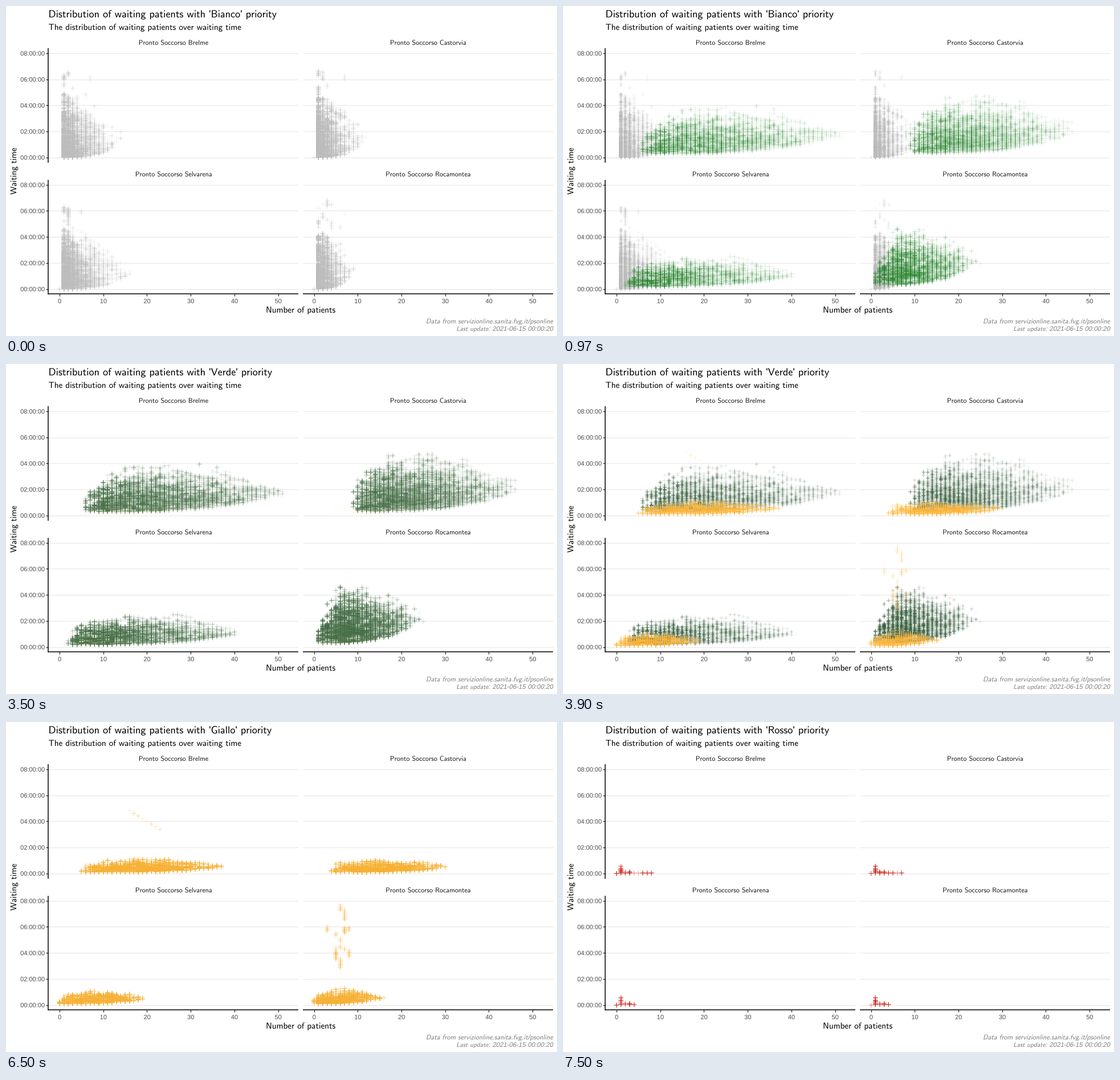
Animation of 967 by 579 pixels, one loop 8 s. Source, as a matplotlib script:

```python
from itertools import groupby

import matplotlib.pyplot as plt
import numpy as np
from matplotlib.animation import FuncAnimation
from matplotlib.patches import PathPatch
from matplotlib.textpath import TextPath
from matplotlib.transforms import Affine2D

plt.rcParams["mathtext.fontset"] = "cm"

W, H, DPI = 967, 579, 64
PX = 72 / DPI
STEP_MS, LOOP_MS = 50, 8000

# panel geometry: pixel of the zero point, pixels per patient and per hour
X0, Y0 = (94.0, 540.6), (265.7, 496.5)
PER_X, PER_H = 7.67, 22.84
EDGES = ((74.3, 513.2), (520.8, 960))
COLS, SUB, WALK = 60, 4, 6
ARM, HALF_STROKE = 4.2, 0.62

PLACES = ["Brelme", "Castorvia", "Selvarena", "Rocamontea"]
NAMES = ["Bianco", "Verde", "Giallo", "Rosso"]

# per panel: fewest patients, most patients, longest wait in hours
WHITE = [(1, 16, 5.2), (1, 13, 5.3), (1, 18, 5.0), (1, 10, 5.4)]
GREEN = [(6, 52, 4.3), (9, 48, 5.2), (2, 43, 2.8), (1, 25, 5.0)]
AMBER = [(5, 38, 1.25), (4, 31, 1.2), (0, 20, 1.25), (0, 16, 1.4)]
RED_LAST = (8, 7, 4, 4)


def falling(s):
    return 1 - .65 * s ** 1.3


def dome(s):
    return .4 + .6 * np.sin(np.pi * s ** .8) ** .6


def cloud(rng, panel, limits, rate, shape, low, x_beta, y_beta):
    """Short random walks of marks between a floor and a shaped top."""
    first, last, peak = limits
    span = last - first
    n = int(rate * span * peak / WALK)
    drift = rng.normal(size=(2, n, WALK)).cumsum(2)
    s = rng.beta(*x_beta, n)[:, None] + .4 * drift[0] / span
    x = np.rint(first + span * s).clip(first, last).astype(int)
    s = (x - first) / span
    floor = peak * (low + .33 * s ** 3)
    room = np.maximum(peak * shape(s) - floor, 0)
    y = floor + room * abs(rng.beta(*y_beta, n)[:, None] + .015 * drift[1])
    return panel, x.ravel(), y.ravel()


def streak(panel, x, start, length):
    """Marks every few minutes while the number of patients stays the same."""
    y = start + np.arange(0, length + .01, .08)
    return panel, np.full(len(y), x), y


def white(rng):
    for k, limits in enumerate(WHITE):
        yield cloud(rng, k, limits, 60, falling, 0, (.9, 3.3), (1, 2.5))
        yield streak(k, 0, 0, 0)
        for x in rng.geometric(.4, 12).clip(1, 7):
            yield streak(k, x, limits[2] * rng.uniform(.8, 1.25), rng.exponential(.2))


def green(rng):
    for k, limits in enumerate(GREEN):
        yield cloud(rng, k, limits, 46, dome, .06, (1.9, 2.7), (1.4, 3.4))


def amber(rng):
    for k, limits in enumerate(AMBER):
        yield cloud(rng, k, limits, 85, dome, .06, (1.9, 2.7), (1.5, 3.3))
    for x in range(16, 24):
        yield streak(0, x, 8.1 - .205 * x, 0)
    for x in rng.integers(3, 10, 16):
        yield streak(3, x, rng.uniform(2.4, 7.4), rng.uniform(.1, .6))


def red(rng):
    for k, last in enumerate(RED_LAST):
        yield streak(k, 0, 0, 0)
        yield streak(k, 1, .55, 0)
        for x in range(1, last + 1):
            yield streak(k, x, .04, .38 / x - .04)


def marks(seed, rule, gain, power, cap):
    """Histogram cell and opacity of every mark of one priority."""
    rng = np.random.default_rng(seed)
    cells, alphas = [], []
    for panel, x, y in rule(rng):
        row = ((Y0[panel // 2] - y * PER_H) * SUB).astype(int)
        cells.append(row * 2 * COLS + panel % 2 * COLS + x)
        alpha = gain / np.maximum(x, 1) ** power * rng.uniform(.3, 1.4, len(x))
        alphas.append(alpha.clip(.02, cap))
    return np.concatenate(cells), np.concatenate(alphas)


MARKS = [marks(3, white, .5, .8, .6), marks(5, green, 2.6, 1, .33),
         marks(7, amber, .3, 0, .5), marks(9, red, 1, 0, .75)]
COLORS = np.array([(188, 188, 188), (70, 112, 70), (255, 180, 50), (200, 28, 18)], float)
ENTER = np.array([(188, 188, 188), (10, 140, 20), (255, 178, 45), (200, 28, 18)], float)
EXIT = np.array([(184, 184, 184), (35, 70, 50), (120, 120, 60), (200, 28, 18)], float)

CENTERS = np.concatenate([x0 + PER_X * np.arange(COLS) for x0 in X0])[:, None]


def cover(half):
    """Share of each pixel column covered by a bar around each x position."""
    px = np.arange(W)
    return np.clip(np.minimum(CENTERS + half, px + 1)
                   - np.maximum(CENTERS - half, px), 0, 1)


def spread(hist, half):
    """Sum of the marks within half a length of each pixel row."""
    w = max(1, round(2 * half * SUB))
    total = np.pad(hist, ((w, w), (0, 0))).cumsum(0)
    window = (total[w:] - total[:-w])[w - w // 2 - 1:][:len(hist)]
    return window.reshape(H, SUB, -1).mean(1)


def layer(k, fade, arm):
    cell, alpha = MARKS[k]
    hist = np.bincount(cell, -np.log(1 - alpha * fade), minlength=H * SUB * 2 * COLS)
    hist = hist.reshape(H * SUB, 2 * COLS)
    depth = (spread(hist, HALF_STROKE) @ cover(arm)
             + spread(hist, arm) @ cover(HALF_STROKE))
    return (1 - np.exp(-depth))[..., None]


def picture(k, p):
    """RGBA image of priority k on its way (p) to the next one."""
    alpha = under = layer(k, 1 - p, ARM * (1 - .5 * p))
    color = np.broadcast_to(COLORS[k], (H, W, 3))
    if p:
        over = layer(k + 1, p, ARM)
        leaving = COLORS[k] + (EXIT[k] - COLORS[k]) * (.06 + .94 * p)
        entering = ENTER[k + 1] + (COLORS[k + 1] - ENTER[k + 1]) * p
        alpha = over + under * (1 - over)
        color = (entering * over + leaving * under * (1 - over)) / np.maximum(alpha, 1e-6)
    return np.concatenate([color, alpha * 255], 2).clip(0, 255).round().astype(np.uint8)


fig = plt.figure(figsize=(W / DPI, H / DPI), dpi=DPI, facecolor="white")
ax = fig.add_axes([0, 0, 1, 1])
ax.axis("off")


def sans(s):
    """Set letters in the sans math face, digits and punctuation in the text face."""
    parts = []
    for word, run in groupby(s, lambda c: c.isalpha() or c == " "):
        run = "".join(run)
        if word:
            run = r"$\mathsf{" + run.replace(" ", r"\hspace{0.38}") + "}$"
        parts.append(run)
    return "".join(parts)


def label(x, y, s, size, color="black", anchor=0, slant=0, turn=0):
    path = TextPath((0, 0), sans(s), size, prop={"family": "Liberation Sans"})
    place = (Affine2D().translate(-anchor * path.get_extents().x1, 0)
             .skew_deg(slant, 0).scale(1, -1).rotate_deg(turn).translate(x, y))
    return ax.add_patch(PathPatch(place.transform_path(path), fc=color, lw=0, zorder=4))


def line(xs, ys, color, width, z):
    ax.plot(xs, ys, color=color, lw=width * PX, solid_capstyle="butt", zorder=z)


for row, y0 in enumerate(Y0):
    top, bottom = y0 - 8.4 * PER_H, y0 + .4 * PER_H
    for hour in range(0, 9, 2):
        y = y0 - hour * PER_H
        for edge in EDGES:
            line(edge, (y, y), "#ebebeb", 1.4, 1)
        line((70.3, 74.3), (y, y), "#333333", 1.4, 3)
        label(67.7, y + 4, f"{hour:02d}:00:00", 11.05, "#4d4d4d", 1)
    line((74.3, 74.3), (top, bottom), "black", 1.5, 3)
    for col, edge in enumerate(EDGES):
        label(sum(edge) / 2, top - 5.7, "Pronto Soccorso " + PLACES[2 * row + col],
              12.1, "#1a1a1a", .5)

for x0, edge in zip(X0, EDGES):
    line(edge, (505.4, 505.4), "black", 1.5, 3)
    for n in range(0, 51, 10):
        x = x0 + n * PER_X
        line((x, x), (505.4, 509.4), "#333333", 1.4, 3)
        label(x, 521.4, str(n), 11.05, "#4d4d4d", .5)

label(74.5, 42, "The distribution of waiting patients over waiting time", 15.1)
label(517, 538, "Number of patients", 15.1, anchor=.5)
label(18.2, 290, "Waiting time", 15.1, anchor=.5, turn=-90)
label(959.5, 557, "Data from servizionline.sanita.fvg.it/psonline", 12.1, "#7f7f7f", 1, 12)
label(959.5, 570, "Last update: 2021-06-15 00:00:20", 11.4, "#7f7f7f", 1, 12)
titles = [label(74.5, 20, f"Distribution of waiting patients with '{name}' priority", 18.15)
          for name in NAMES]

image = ax.imshow(picture(0, 0), extent=(0, W, H, 0), interpolation="nearest",
                  aspect="auto", zorder=2)
ax.set_xlim(0, W)
ax.set_ylim(H, 0)


def phase(t):
    """Priority shown at time t and progress towards the next, at 15 steps a second."""
    if t < 500:
        return 0, 0
    k, u = divmod(t - 500, 3000)
    if u >= 1000:
        return k + 1, 0
    return k, max(u * 15 // 1000 / 15, .004)


cache = {}


def draw(i):
    k, p = phase(i * STEP_MS)
    if (k, p) not in cache:
        cache[k, p] = picture(k, p)
    image.set_data(cache[k, p])
    for j, title in enumerate(titles):
        title.set_visible(j == k + (p > .5))
    return [image, *titles]


anim = FuncAnimation(fig, draw, frames=LOOP_MS // STEP_MS, interval=STEP_MS,
                     init_func=lambda: draw(0), repeat=True, repeat_delay=0)
plt.show()
```
